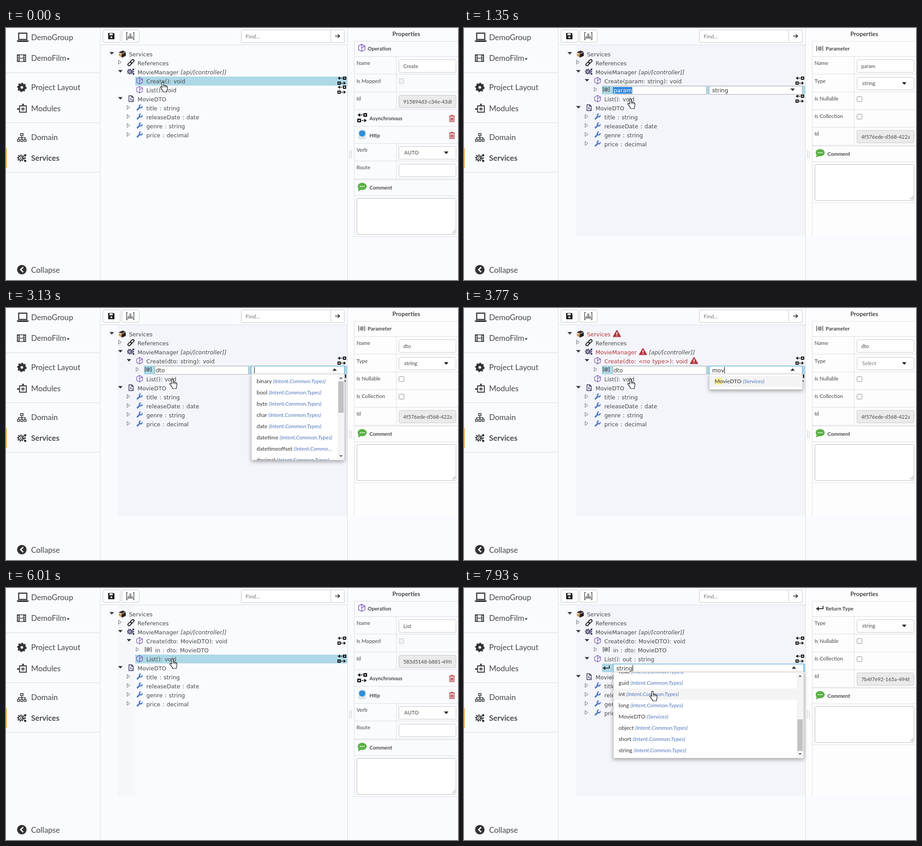
Write an HTML page that moves like this. It is 1000 by 560 pixels and loops after 8 s.

```html
<!DOCTYPE html>
<html lang="en">
<head>
<meta charset="utf-8">
<title>Service designer</title>
<style>
html, body { margin: 0; width: 100%; height: 100%; overflow: hidden; background: #fafbfe; }
#stage { display: block; width: 1000px; height: 560px; }
text { white-space: pre; }
.ui { font-family: Lato, sans-serif; }
.tree { font-family: "DejaVu Sans", sans-serif; font-size: 12.4px; word-spacing: 1px; }
.pop { filter: drop-shadow(0 3px 4px #0005); }
</style>
</head>
<body>
<svg id="stage" viewBox="0 0 1000 560"></svg>
<script>
const LOOP = 8000;
const INK = '#333', TEXT = '#484848', LINE = '#dcdde0', EDGE = '#c4c6ca', BLUE = '#add8e6',
      FOCUS = '#4a9bdc', RED = '#b3383e';
const TREE = '12.4px "DejaVu Sans", sans-serif', LIST = '12.3px Lato, sans-serif';

// Each step changes part of the state from its time on.
const steps = [
  [0, { view: 'create', cursor: [347, 121], hover: -1 }],
  [370, { click: true }],
  [530, { click: false, menu: [346, 122] }],
  [800, { cursor: [350, 129] }],
  [950, { cursor: [368, 158], hover: 1 }],
  [1080, { click: true }],
  [1350, { click: false, menu: null, hover: -1, view: 'param', name: 'param', saved: 'param',
           picked: 'name', typed: 'string', type: 'string' }],
  [2190, { name: 'd', picked: '', caret: 'name' }],
  [2340, { name: 'dt' }],
  [2490, { name: 'dto' }],
  [2610, { saved: 'dto', open: true, focus: true, caret: 'type', query: '' }],
  [2730, { picked: 'type', caret: '' }],
  [3130, { picked: '', typed: '', caret: 'type' }],
  [3250, { type: '', errors: true }],
  [3530, { typed: 'm' }],
  [3650, { typed: 'mo', query: 'm' }],
  [3770, { typed: 'mov', query: 'mo' }],
  [3910, { typed: 'movi', query: 'mov' }],
  [4030, { typed: 'movie', query: 'movi' }],
  [4180, { query: 'movie' }],
  [4500, { caret: '' }],
  [4800, { open: false, typed: 'MovieDTO', type: 'MovieDTO' }],
  [5050, { errors: false }],
  [6010, { view: 'list' }],
  [6380, { click: true }],
  [6540, { click: false, menu: [367, 159] }],
  [6840, { cursor: [377, 180], hover: 0 }],
  [6960, { cursor: [390, 206], hover: 1 }],
  [7080, { cursor: [403, 226], hover: 2 }],
  [7230, { cursor: [412, 237] }],
  [7390, { cursor: [415, 233] }],
  [7510, { cursor: [417, 230] }],
  [7660, { click: true }],
  [7810, { click: false, menu: null, hover: -1, view: 'return', typed: 'string', caret: 'type' }],
  [7930, { open: true }]
];
const typeNames = ('binary bool byte char date datetime datetimeoffset decimal double float guid int long ' +
  'MovieDTO object short string').split(' ');

const pen = document.createElement('canvas').getContext('2d');
function measure(str, font = TREE) {
  pen.font = font;
  return pen.measureText(str).width + (font === TREE ? str.split(' ').length - 1 : 0);
}
const esc = str => str.replace(/&/g, '&amp;').replace(/</g, '&lt;');

// Drawing helpers; text is placed by its vertical centre.
const ui = (x, y, str, size, attrs = '') =>
  `<text class="ui" x="${x}" y="${y + size * .36}" font-size="${size}" fill="${TEXT}" ${attrs}>${esc(str)}</text>`;
const bold = (x, y, str, size = 11.5) => ui(x, y, str, size, 'font-weight="700"');
const label = (x, y, str, fill = TEXT, attrs = '') =>
  `<text class="tree" x="${x}" y="${y + 4.6}" fill="${fill}" ${attrs}>${esc(str)}</text>`;
const rect = (x, y, w, h, fill, stroke = 'none', r = 0) =>
  `<rect x="${x}" y="${y}" width="${w}" height="${h}" fill="${fill}" stroke="${stroke}" rx="${r}"/>`;
const box = (x, y, w, h, fill = '#fff', stroke = EDGE, r = 2) => rect(x + .5, y + .5, w, h, fill, stroke, r);
const fill = (d, color = INK) => `<path d="${d}" fill="${color}"/>`;
const line = (d, color = LINE, w = 1, attrs = '') =>
  `<path d="${d}" fill="none" stroke="${color}" stroke-width="${w}" ${attrs}/>`;
const dot = (x, y, r, color = INK) => `<circle cx="${x}" cy="${y}" r="${r}" fill="${color}"/>`;
const at = (x, y, art, scale = 1) => `<g transform="translate(${x} ${y}) scale(${scale})">${art}</g>`;
const down = (x, y, w = 5, color = INK) => fill(`M${x - w} ${y - w / 2}h${2 * w}l${-w} ${w * 1.1}z`, color);
const up = (x, y, w = 5, color = INK) => fill(`M${x - w} ${y + w / 2}h${2 * w}l${-w} ${-w * 1.1}z`, color);
const closed = (x, y) => line(`M${x - 2.5} ${y - 4.5}v9l6-4.5z`, '#666');
const caretLine = (x, y) => line(`M${Math.round(x) + .5} ${y - 7}v14`, '#000');

const gear = (color, hole) => `<circle r="6.4" fill="none" stroke="${color}" stroke-width="2.4" pathLength="16"
  stroke-dasharray="1 1"/><circle r="4.2" fill="none" stroke="${color}" stroke-width="${hole}"/>`;
const services = color => at(-2, 0, gear(color, 2) + dot(0, 0, 1.4, color), .85) +
  line('M3-2 6-5M3 2 6 5M0 0H6', color, 1.2) + dot(6, -5, 2, color) + dot(6, 5, 2, color) + dot(6, 0, 1.4, color);
const sitemap = color => line('M-2.5-7.5h5v4h-5zM-8.5 4h4v4h-4zM-2 4h4v4h-4zM4.5 4h4v4h-4zM0-3.5V4M-6.5 4V.5h13V4', color, 1.4);
const cube = line('M0-7.2 6.5-3.7V3.8L0 7.3-6.5 3.8V-3.7zL0 0 6.5-3.7M0 0V7', '#7552b5', 1.2);
const wrench = line('M-4.8 4.8.8-.8', '#4f7cc4', 3.4, 'stroke-linecap="round"') +
  line('M5.8-3.2A3.3 3.3 0 1 1 2.8-6', '#4f7cc4', 2.5);
const chain = `<g transform="rotate(-45)" fill="none" stroke="#222" stroke-width="2">
  <rect x="-8.5" y="-2.6" width="9" height="5.2" rx="2.6"/><rect x="-.5" y="-2.6" width="9" height="5.2" rx="2.6"/></g>`;
const books = fill('M-8-4 1-8 8-5-1-1z', '#3d3028') + fill('M-7-2-1 1V7l-6-3z', '#c59a4a') + fill('M-1 0 8-4V4l-9 4z', '#262321');
const doc = line('M-4.5-6.5h6l3.5 3.5v9.5h-9.5zM1.5-6.5V-3H5', '#2b2b55', 1.4) + line('M-2 .5h2v3M2 3.5h2', '#2b2b55', 1.4);
const bracketAt = `<text class="ui" text-anchor="middle" y="3.5" font-size="11" font-weight="700" fill="#333">[@]</text>`;
const returnArrow = line('M7-5V1H-3', '#333', 2) + fill('M-8 1-2-3.5V5.5z');
const async = line('M-3-5.5h4M-1 5.5h4', '#000', 2, 'stroke-dasharray="2 1"') +
  fill('M-9-5.5-4-9V-2zM9 5.5 4 2V9z', '#000') + line('M3.5-8h5v5h-5zM-8.5 3h5v5h-5z', '#000', 2.2);
const warning = line('M0-7 8 6.5H-8z', RED, 2, 'stroke-linejoin="round"') + fill('M0-7 8 6.5H-8z', RED) +
  line('M0-3V2M0 3.5v2', '#fff', 2);
const trash = line('M-6.5-5h13M-2-5v-2h4v2M-4.8-4v11h9.6V-4M-2-2v7M0-2v7M2-2v7', RED, 1.5);
const bubble = `<ellipse cx="0" cy="-1" rx="10" ry="8" fill="#5bb047"/>` + fill('M-8 2l-1 8 7-4z', '#5bb047') +
  dot(-4, -1, 1.3, '#fff') + dot(0, -1, 1.3, '#fff') + dot(4, -1, 1.3, '#fff');
const web = rect(-7, -9, 14, 18, '#e6e9ee', '#bfc7d2', 1) + dot(0, -2.5, 7, '#2f8fd8');
const pencil = fill('M-6 6-5 2 2.5-5.5 5.5-2.5-2 5z') + line('M3.8-6.8 6.8-3.8', INK, 2);
const hand = `<path d="M-1.8 11V1A1.8 1.8 0 0 1 1.8 1V7.2A1.7 1.7 0 0 1 5 7.7 1.7 1.7 0 0 1 7.8 8.3 1.6 1.6 0 0 1 10 9.9V14.5
  q0 2-1.2 3.5v3H.2v-2.5l-5.2-6.4q-1.6-1.9.2-2.6 1.6-.4 3 1.5z" fill="#fff" stroke="#111" stroke-width="1.2"/>` +
  line('M1.8 7v4M5 8v3M7.8 9v2', '#111');

function sidebar() {
  const entry = (y, str) => ui(55.5, y, str, 17.2);
  return line('M208.5 0V560M0 99.5H208M0 210.5H208M0 320.5H208') + rect(0, 266, 1.5, 45, '#f5a623') +
    line('M28 11.5H46V25.5H28z', INK, 2.4) + fill('M24 27.5H50V29.5L48 31H26L24 29.5z') + entry(21, 'DemoGroup') +
    line('M25 59.5H43.5V74.5H25zM29.5 59V75M39 59V75M29.5 67H39', INK, 1.6) +
    line('M27 60V75M41.5 60V75', INK, 2.5, 'stroke-dasharray="2 2"') + entry(67, 'DemoFilm') + down(137.5, 69, 3.5) +
    at(35, 132, gear(INK, 4.2), 1.38) + entry(132, 'Project Layout') +
    line('M30 173H45V187H30zM37.5 176V184M33.5 180H41.5M30 180H26M37.5 173V169', INK, 1.9) +
    dot(26.5, 180, 2) + dot(37.5, 170, 2) + entry(179, 'Modules') +
    at(35, 243, sitemap(INK), 1.12) + entry(243, 'Domain') +
    at(35, 289, services(INK), 1.25) + bold(55.5, 289, 'Services', 17) +
    dot(35, 537, 10.5) + line('M38 531.5 32.5 537 38 542.5', '#fff', 2.6) + entry(538, 'Collapse');
}

function toolbar() {
  return line('M209 37.5H755M755.5 0V560M770.5 29V463') + line('M760 272V290M764 272V290', '#c8c8c8') +
    box(214, 4, 38, 27) + fill('M226 11H238L240 13V25H226z', '#222') + rect(229, 12, 7, 4, '#fff') + dot(233, 20.5, 2, '#fff') +
    box(256, 4, 38, 27) + at(275, 18, sitemap('#333'), .65) + line('M269 10H267V26H269M281 10H283V26H281', INK, 1.3) +
    box(520, 4, 198, 28) + ui(530, 19, 'Find...', 12, 'fill-opacity=".75"') + box(718, 4, 30, 28) +
    line('M728 18H738M734 14 738 18 734 22', '#222', 1.7);
}

function tree(s) {
  const { view } = s, withParam = view !== 'create', isReturn = view === 'return';
  const tone = s.errors ? RED : TEXT;
  const warn = (x, y, str) => s.errors ? at(x + measure(str) + 14, y - 1, warning) : '';
  const args = withParam ? `${s.saved}: ${s.type || '<no type>'}` : '';
  const create = `Create(${args}): void`;
  const listY = withParam ? 158 : 138, dtoY = listY + (isReturn ? 40 : 20);
  let out = '';
  if (view === 'create') out += rect(286, 108, 469, 20, BLUE);
  if (view === 'list') out += rect(286, 148, 469, 19.5, BLUE);
  out += down(234, 56) + at(257, 58, books) + label(272, 58, 'Services', tone) + warn(272, 58, 'Services') +
    closed(251.5, 76) + at(276.5, 77, chain) + label(291, 78, 'References') +
    down(253, 96) + at(276, 97, services('#2b2b55')) + label(291, 98, 'MovieManager', tone) + warn(291, 98, 'MovieManager') +
    label(s.errors ? 409 : 386, 98, '[api/[controller]]', TEXT, 'font-style="italic"') +
    (withParam ? down(272, 116) : '') + at(295.5, 117, cube) + label(310.5, 118, create, tone) + warn(310.5, 118, create) +
    at(743, 117, async);
  if (view === 'param') out += rect(305, 128, 450, 19.5, BLUE);
  if (withParam) out += closed(290.5, 136.5) + at(314.5, 136.5, bracketAt);
  if (withParam && view !== 'param') out += label(330, 138, 'in : dto: MovieDTO');
  out += (isReturn ? down(272, 156) : '') + at(295.5, listY - 1, cube) +
    label(310.5, listY, isReturn ? 'List(): out : string' : 'List(): void') + at(743, listY - 1, async);
  if (isReturn) out += rect(305, 168, 450, 19, BLUE) + at(314.5, 177, returnArrow);
  out += down(253, dtoY - 2) + at(276.5, dtoY - 1, doc) + label(291, dtoY, 'MovieDTO');
  ['title : string', 'releaseDate : date', 'genre : string', 'price : decimal'].forEach((field, i) => {
    const y = dtoY + 20 * (i + 1);
    out += closed(270.5, y - 1.5) + at(295.5, y - 1, wrench) + label(310.5, y, field);
  });
  return out;
}

function field(x, y, w, str, { picked, caret, focus, arrow } = {}) {
  const width = measure(str), tx = x + (arrow ? 7 : 2);
  return box(x, y - 9.5, w, 18.5, '#fff', focus ? FOCUS : '#a5a8ab', 1) +
    (picked ? rect(tx - 1, y - 7, width + 2, 15, '#2f86dd') : '') + label(tx, y, str, picked ? '#fff' : '#333') +
    (caret ? caretLine(tx + width, y) : '') + (arrow ? arrow(x + w - 21, y - 1) : '');
}

function dropdown({ x, y, w, names, h = names.length * 25 + 9, first = 16, hover = -1, query = '', thumb }) {
  const limit = 170;
  const rows = names.map((name, i) => {
    const cy = first + 25 * i, hit = query ? name.toLowerCase().indexOf(query) : -1;
    let origin = name === 'MovieDTO' ? '(Services)' : '(Intent.Common.Types)';
    const width = str => measure(name + ' ', LIST) + measure(str, 'italic ' + LIST);
    if (w < 300 && width(origin) > limit) {
      while (width(origin + '...') > limit) origin = origin.slice(0, -1);
      origin += '...';
    }
    return (i === hover ? rect(0, cy - 12.5, w, 25, '#f4f4f4') : '') +
      (hit >= 0 ? rect(11.5 + measure(name.slice(0, hit), LIST), cy - 7, measure(query, LIST), 14, '#f8ee97') : '') +
      `<text class="ui" x="11.5" y="${cy + 4.4}" font-size="12.3" fill="#333">${name} <tspan font-style="italic" fill="#5479bd">${origin}</tspan></text>`;
  }).join('');
  const bar = thumb ? rect(w - 15, 0, 14, h, '#f4f4f4') + rect(w - 14, thumb, 12, 70, '#c1c1c1') +
    up(w - 8, 8.5, 3.5, '#555') + down(w - 8, h - 9, 3.5, '#555') : '';
  return `<g class="pop">${rect(x, y, w, h, '#fff', '#ccc')}</g>
    <svg x="${x}" y="${y}" width="${w}" height="${h}">${rows}${bar}</svg>`;
}

function editor(s) {
  if (s.view === 'return') {
    return field(330, 178, 421, s.typed, { caret: true, focus: true, arrow: s.open ? up : down }) +
      (s.open ? dropdown({ x: 330.5, y: 187, w: 421, h: 191, names: typeNames.slice(9), first: -1, hover: 2, thumb: 105 }) : '');
  }
  if (s.view !== 'param') return '';
  let out = field(329, 138, 207, s.name, { picked: s.picked === 'name', caret: s.caret === 'name' }) +
    field(542, 138, 206, s.typed, { picked: s.picked === 'type', caret: s.caret === 'type', focus: s.focus, arrow: s.open ? up : down });
  if (s.open) {
    const names = typeNames.filter(name => name.toLowerCase().includes(s.query));
    out += s.query
      ? dropdown({ x: 543, y: 147, w: 206, names, hover: 0, query: s.query })
      : dropdown({ x: 543, y: 147, w: 206, h: 191, names: names.slice(0, 8), thumb: 16 });
  }
  return out;
}

function properties(s) {
  const operation = s.view === 'create' || s.view === 'list';
  let y = 64, out = ui(885.5, 13.5, 'Properties', 13.3, 'font-weight="700" text-anchor="middle"') + line('M770 29.5H1000M770 63.5H1000');
  const row = (name, control) => {
    const bottom = Math.round(y + 39.3) - .5;
    out += ui(775.5, y + 14, name, 11.7) + control(Math.round(y)) + line(`M770 ${bottom}H1000M863.5 ${y}V${bottom}`);
    y += 39.3;
  };
  const input = (str, locked) => top => box(869, top + 6, 126, 28, locked ? '#ebebeb' : '#fff', EDGE, 3) +
    `<svg x="879" y="${top}" width="107" height="39">${ui(0, 20.5, str, 11.3)}</svg>`;
  const select = str => top => box(869, top + 6, 126, 28, '#fff', EDGE, 3) +
    ui(881, top + 19.5, str || 'Select', 11.6, str ? '' : 'fill-opacity=".75"') + down(974, top + 20, 4.8, '#111');
  const check = off => top => box(869, top + 9, 11, 11, off ? '#f0f0f0' : '#fff', off ? '#ccc' : '#888');
  const section = (icon, name, scale = 1) => {
    out += at(788, y + 17.5, icon, scale) + bold(804, y + 19, name) + at(986.5, y + 19, trash) + line(`M770 ${Math.round(y + 37.5) - .5}H1000`);
    y += 37.5;
  };

  if (operation) {
    out += at(787, 44, cube, 1.1) + bold(800, 46, 'Operation');
    row('Name', input(s.view === 'create' ? 'Create' : 'List'));
    row('Is Mapped', check(true));
    row('Id', input(s.view === 'create' ? '915894d3-c34e-43d8' : '583d5148-b881-49f6', true));
    section(async, 'Asynchronous', 1.12);
    section(web, 'Http');
    row('Verb', select('AUTO'));
    row('Route', input(''));
  } else {
    const isReturn = s.view === 'return';
    out += at(787, 45, isReturn ? returnArrow : bracketAt, 1.05) + bold(800, 46, isReturn ? 'Return Type' : 'Parameter');
    if (!isReturn) row('Name', input(s.saved));
    row('Type', select(isReturn ? 'string' : s.type));
    row('Is Nullable', check());
    row('Is Collection', check());
    row('Id', input(isReturn ? '7b4f7e92-165a-4948' : '4f576ede-d568-422a', true));
  }
  y = Math.round(y);
  return out + line(`M770 ${y + 1.5}H1000M770 ${y + 36.5}H1000M770 ${y + 127.5}H1000`) + at(788, y + 17, bubble) +
    bold(804, y + 19, 'Comment') + box(776, y + 42, 219, 80, '#fff', '#bbb') +
    line(`M987 ${y + 120}l7-7M991 ${y + 120}l3-3`, '#777');
}

function menu([x, y], hover) {
  const items = [
    [pencil, 'Rename', 'F2', 18], [bracketAt, 'Add Parameter', 'ctrl + shift + p', 43],
    [at(0, 0, returnArrow, .8), 'Add Return Type', 'ctrl + shift + r', 68],
    ['<text class="ui" text-anchor="middle" y="4" font-size="12" font-weight="700" fill="#2b2b55">@</text>', 'Add Stereotype', 'F3', 93],
    [line('M-4-4 4 4M4-4-4 4', '#222', 2.4), 'Delete', 'delete', 136]
  ];
  return at(x, y, `<g class="pop">${box(0, 0, 219, 153, '#fff', '#c2c2c2')}</g>` + line('M1 114.5H219', '#ddd') +
    items.map(([icon, name, keys, cy], i) => (i === hover ? rect(1, cy - 12, 218, 25, '#f4f4f4') : '') +
      at(19, cy, icon) + ui(29.5, cy, name, 13.4) +
      ui(209, cy - 1, keys, 12.5, 'font-style="italic" text-anchor="end"')).join(''));
}

function backdrop(view) {
  if (view === 'create') return '';
  if (view === 'list') return rect(247, 38, 38.5, 425, '#f6f7fb');
  return rect(247, 38, 508, 425, '#f4f5fa') + rect(756, 8, 244, 455, '#fdfdfe');
}

function scene(s) {
  return rect(0, 0, 1000, 560, '#fafbfe') + backdrop(s.view) + sidebar() + toolbar() + tree(s) + properties(s) + editor(s) +
    (s.menu ? menu(s.menu, s.hover) : '') + at(...s.cursor, hand) +
    (s.click ? at(...s.cursor, '<circle r="9.3" fill="none" stroke="#333" stroke-width="1.2"/>') : '');
}

const stage = document.getElementById('stage');
let shown = -1;
function tick() {
  const t = performance.now() % LOOP;
  const current = steps.filter(([start]) => start <= t);
  if (current.length !== shown) {
    shown = current.length;
    stage.innerHTML = scene(Object.assign({}, ...current.map(([, change]) => change)));
  }
  requestAnimationFrame(tick);
}
tick();
</script>
</body>
</html>
```
